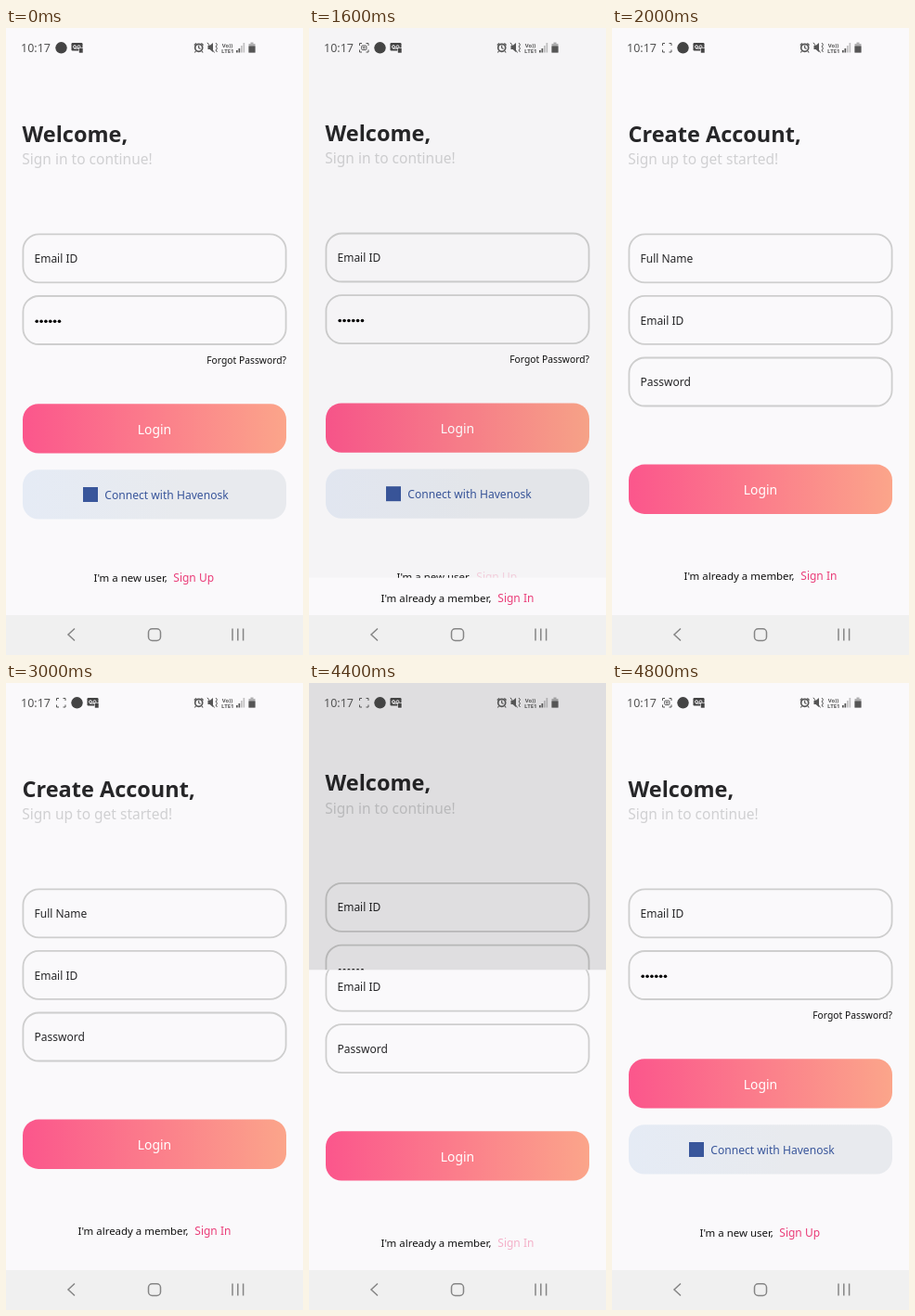
These frames come from a looping animation (320 by 676 pixels, 5 s). An HTML page:

```html
<!DOCTYPE html>
<html lang="en">
<head>
<meta charset="utf-8">
<title>Login and sign up</title>
<style>
  html, body { margin: 0; width: 100%; height: 100%; overflow: hidden; background: #faf9fb; }
  svg { display: block; width: 320px; height: 676px; font-family: "Noto Sans", "Open Sans", sans-serif; }
  .title { font-size: 23.5px; font-weight: 600; fill: #262628; }
  .sub { font-size: 15.5px; fill: #d0d0d2; }
  .label { font-size: 12px; fill: #262628; }
  .field { fill: none; stroke: #cecece; stroke-width: 1.8; }
  .login { font-size: 13.9px; fill: #fff; text-anchor: middle; }
  .small { font-size: 10.3px; fill: #111; text-anchor: end; }
  .note { font-size: 11.45px; fill: #111; }
  .link { font-size: 12px; font-weight: 500; fill: #ea3c78; }
  .brand { font-size: 12.1px; fill: #39569b; }
  .line { fill: none; stroke: #555; }
</style>
</head>
<body>
<svg viewBox="0 0 320 676">
  <defs>
    <linearGradient id="pink"><stop stop-color="#fb568c"/><stop offset="1" stop-color="#fba58a"/></linearGradient>
    <linearGradient id="pale"><stop stop-color="#e5ebf5"/><stop offset=".6" stop-color="#e8eaee"/></linearGradient>
    <clipPath id="reveal"><rect id="window" width="320" height="676"/></clipPath>
  </defs>

  <g id="signIn"></g>
  <rect id="shade" width="320" height="640"/>
  <g clip-path="url(#reveal)"><g id="signUp"></g></g>

  <rect y="633" width="320" height="43" fill="#f0f0f0"/>
  <g fill="none" stroke="#858585" stroke-width="1.5">
    <path d="M74 647.5L67 654L74 660.5M244 647.5V660.5M249.8 647.5V660.5M255.6 647.5V660.5"/>
    <rect x="153.5" y="647.8" width="13" height="12.6" rx="4"/>
  </g>

  <g fill="#555">
    <text x="16" y="26" font-size="12.5">10:17</text>
    <g id="capture">
      <path class="line" d="M54.5 19V16.5H57M61.5 16.5H64V19M64 23.500V26H61.5M57 26H54.5V23.5"/>
      <g id="camera" class="line"><rect x="56.7" y="19" width="5.2" height="4.600" rx="1"/><circle cx="59.300" cy="21.300" r=".8"/></g>
    </g>
    <g id="notices">
      <circle cx="59.500" cy="21.300" r="6.2" fill="#444"/>
      <rect x="70.500" y="16" width="12" height="8.500" rx="1.2" fill="#444"/>
      <path d="M73.500 22H78" stroke="#faf9fb" fill="none"/>
      <g fill="none" stroke="#faf9fb"><circle cx="74" cy="20.300" r="1.5"/><circle cx="78.500" cy="20.300" r="1.5"/></g>
      <rect x="78.500" y="21.500" width="4.500" height="5.500" fill="#444" stroke="#faf9fb" stroke-width=".6"/>
    </g>
    <circle cx="207.700" cy="21.300" r="4" class="line" stroke-width="1.700"/>
    <path class="line" d="M207.700 18.800V21.500L209.500 22.500M202.800 18.500L205 16.300M212.600 18.500L210.400 16.300M204.500 25L203.300 26.500M211 25L212.200 26.500" stroke-width="1.200"/>
    <path d="M217.500 19H219.500L223 16V26L219.500 23H217.500Z"/>
    <path class="line" d="M217 15.800L224.500 26.500M226 16L227.500 18L226 20L227.500 22L226 24L227.500 26"/>
    <g font-weight="700" text-anchor="middle"><text x="238.500" y="20.500" font-size="6">Vo))</text><text x="238.800" y="26.600" font-size="6">LTE1</text></g>
    <path d="M248 24h1.700v2.500h-1.700zM250.500 22h1.700v4.500h-1.700z"/>
    <path d="M253 19h1.700v7.500h-1.700zM255.500 16h1.700v10.500h-1.700z" opacity=".35"/>
    <path d="M263.500 15.500h3v1.500h2V26.500h-7V17h2z" opacity=".45"/>
    <rect x="261.500" y="19.500" width="7" height="7"/>
  </g>
</svg>
<script>
const $ = id => document.getElementById(id);
const text = (cls, x, y, s, id = '') => `<text class="${cls}" x="${x}" y="${y}" id="${id}">${s}</text>`;
const box = (y, attrs) => `<rect x="18" y="${y}" width="284" height="53.3" rx="17" ${attrs}/>`;
const field = (y, label) =>
  `<rect class="field" x="18.4" y="${y}" width="283.2" height="52" rx="17"/>` + text('label', 30.5, y + 30.6, label);
const page = (title, sub, loginY) => '<rect width="320" height="700" fill="#faf9fb"/>' +
  text('title', 17.5, 122.7, title) + text('sub', 17.3, 147, sub) +
  box(loginY, 'fill="url(#pink)"') + text('login', 160, loginY + 32.4, 'Login');

const dots = Array.from({ length: 6 }, (_, i) => `<circle cx="${33.2 + i * 4.85}" cy="316.3" r="1.8"/>`).join('');

$('signIn').innerHTML = page('Welcome,', 'Sign in to continue!', 405.2) +
  field(222.3, 'Email ID') + field(289, '') + dots +
  text('small', 302, 362, 'Forgot Password?') +
  box(476.3, 'fill="url(#pale)"') +
  '<rect x="83" y="495" width="16" height="16" fill="#39569b"/>' +
  text('brand', 106.3, 508, 'Connect with Havenosk') +
  text('note', 94.5, 597, "I'm a new user,") + text('link', 180.3, 597, 'Sign Up', 'toSignUp');

$('signUp').innerHTML = page('Create Account,', 'Sign up to get started!', 470.6) +
  ['Full Name', 'Email ID', 'Password'].map((s, i) => field(222.3 + i * 66.6, s)).join('') +
  text('note', 77.5, 595, "I'm already a member,") + text('link', 203.3, 595, 'Sign In', 'toSignIn');

const LOOP = 5000, STEP = 100, HEIGHT = 633;
const OPEN = 1581, CLOSE = 4315, DURATION = 425;
const clamp = v => Math.min(1, Math.max(0, v));
const inOut = v => v < .5 ? 2 * v * v : 1 - 2 * (1 - v) ** 2;

// cubic-bezier(.35, .45, 0, 1)
function ease(x) {
  if (x <= 0 || x >= 1) return clamp(x);
  const curve = (a, b, u) => 3 * a * u * (1 - u) ** 2 + 3 * b * u * u * (1 - u) + u ** 3;
  let lo = 0, hi = 1;
  for (let i = 0; i < 24; i++) {
    const mid = (lo + hi) / 2;
    if (curve(.35, 0, mid) < x) lo = mid; else hi = mid;
  }
  return curve(.45, 1, lo);
}

// A link dims while pressed and recovers after release.
const pressOpacity = (t, release) =>
  t < release - 100 ? 1 : .2 + .8 * inOut(clamp((t - release) / 250));

const moveY = (id, y) => $(id).setAttribute('transform', `translate(0 ${y})`);

function draw(t) {
  const p = ease((t - OPEN) / DURATION) - ease((t - CLOSE) / DURATION);
  const top = HEIGHT * (1 - p);
  $('window').setAttribute('y', p > 0 ? top : 676);
  moveY('signUp', .041 * top);
  moveY('signIn', -.02 * HEIGHT * p);
  $('shade').setAttribute('opacity', .11 * Math.min(1, p / .36));
  $('toSignUp').setAttribute('opacity', pressOpacity(t, OPEN));
  $('toSignIn').setAttribute('opacity', pressOpacity(t, CLOSE));

  const shown = inOut(clamp(t / 300));
  $('notices').setAttribute('transform', `translate(${17 * shown} 0)`);
  $('capture').setAttribute('opacity', shown);
  $('camera').setAttribute('opacity', t % 1000 < 500 ? 0 : 1);
}

const start = performance.now();
function tick() {
  const t = (performance.now() - start) % LOOP;
  draw(Math.floor(t / STEP) * STEP);
  requestAnimationFrame(tick);
}
tick();
</script>
</body>
</html>
```
